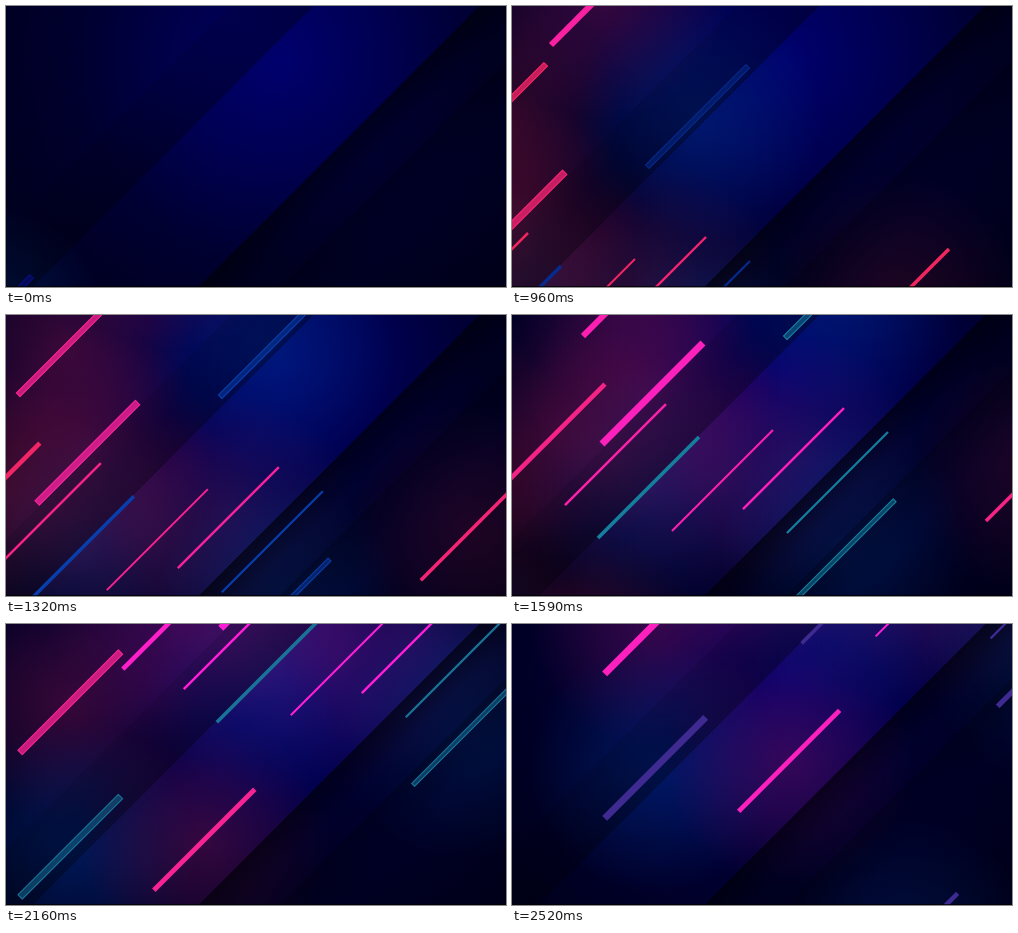
An HTML page with a canvas that plays this animation: 500 by 281 pixels, repeating every 2550 ms.

```html
<!DOCTYPE html>
<html lang="en">
<head>
<meta charset="utf-8">
<title>Neon streaks</title>
<style>
  html, body { margin: 0; width: 100%; height: 100%; overflow: hidden; background: #000018; }
  canvas { display: block; width: 500px; height: 281px; }
</style>
</head>
<body>
<canvas width="500" height="281"></canvas>
<script>
const W = 500, H = 281, LOOP = 2550, STEP = 30;
const SPEED = 0.219, SPAN = 101, GLOW = 125;
const ctx = document.querySelector('canvas').getContext('2d');

// Each streak runs along x + y = c: [c, head x at 960 ms, width, is blue]
const streaks = [
  [92, 34, 6, 0], [78, 140, 6, 0], [219, 53, 7, 0], [296, 236, 6, 1],
  [243, 16, 2.5, 0], [309, 49, 3.6, 1], [376, 123, 2, 0], [425, 194, 2.4, 0],
  [493, 238, 2.2, 1], [680, 437, 3.6, 0], [568, 245, 5, 1], [162, -45, 4.6, 0],
  [142.5, -148, 7, 0], [287, -148, 7, 1], [414, -14, 4.8, 0], [715, 104, 4.5, 1]
];

// Colour of the blue streaks over time: [ms, r, g, b]
const blues = [
  [0, 8, 12, 130], [960, 5, 42, 140], [1320, 8, 62, 172], [1590, 20, 128, 158],
  [1920, 85, 110, 172], [2160, 25, 115, 152], [2520, 62, 42, 145]
];

const mix = (a, b, k) => a.map((v, i) => v + (b[i] - v) * k);
const rgba = (c, a = 1) => `rgba(${c.map(Math.round)},${a})`;
const clamp = v => Math.max(0, Math.min(1, v));

function blueAt(t) {
  const i = Math.max(1, blues.findIndex(b => b[0] >= t));
  const [a, b] = [blues[i - 1], blues[i]];
  return mix(a, b, (t - a[0]) / (b[0] - a[0])).slice(1);
}

function fillAll(gradient, stops) {
  stops.forEach(([p, color]) => gradient.addColorStop(p, color));
  ctx.fillStyle = gradient;
  ctx.fillRect(0, 0, W, H);
}

const backdrop = () => fillAll(ctx.createRadialGradient(275, 55, 0, 275, 55, 340), [
  [0, 'rgb(0,0,110)'], [0.3, 'rgb(0,0,84)'], [0.6, 'rgb(0,0,50)'], [1, 'rgb(0,0,28)']
]);

// Diagonal panels with hard shadow edges
const panels = () => fillAll(ctx.createLinearGradient(0, 0, 390.5, 390.5), [
  [0, 0.05], [225, 0.1], [225, 0.2], [308, 0.35], [308, 0], [474, 0.05],
  [474, 0.72], [520, 0.42], [555, 0.4], [555, 0.55], [620, 0.3], [781, 0.3]
].map(([c, a]) => [c / 781, `rgba(0,0,8,${a})`]));

function place([c, start, w, blue], t) {
  const x = start + SPEED * (t - 960);
  const age = (x - Math.max(0, c - H)) * (c > 600 ? 0.5 : 1);
  const color = blue ? blueAt(t) : mix([240, 38, 85], [255, 30, 215], clamp(age / 240));
  return { x, y: c - x, w, blue, age, color };
}

function glow({ x, y, w, blue, color }) {
  const cx = x - SPAN / 2, cy = y + SPAN / 2;
  const tint = blue ? [0, 50, 140] : color.map(v => v * 0.5);
  const alpha = Math.min(0.48, 0.1 + w * 0.07);
  fillAll(ctx.createRadialGradient(cx, cy, 0, cx, cy, GLOW), [
    [0, rgba(tint, alpha)], [0.5, rgba(tint, alpha * 0.55)], [1, rgba(tint, 0)]
  ]);
}

function bar({ x, y, w, blue, age, color }, t) {
  const length = SPAN * Math.SQRT2;
  const hollow = w >= 5 && (blue ? t < 2400 : age < 140);
  ctx.save();
  ctx.translate(x, y);
  ctx.rotate(-Math.PI / 4);
  ctx.fillStyle = rgba(color, hollow ? (blue ? 0.5 : 0.78) : 1);
  ctx.fillRect(-length, -w / 2, length, w);
  if (hollow) {
    ctx.strokeStyle = rgba(color);
    ctx.strokeRect(0.5 - length, 0.5 - w / 2, length - 1, w - 1);
  }
  ctx.restore();
}

function draw(now) {
  const t = Math.floor(now % LOOP / STEP) * STEP;
  const live = streaks.map(s => place(s, t));
  backdrop();
  live.forEach(glow);
  panels();
  live.forEach(s => bar(s, t));
  ctx.fillStyle = 'rgba(0,0,0,0.75)';
  ctx.fillRect(0, H - 1, W, 1);
}

let begin;
function tick(now) {
  begin ??= now;
  draw(now - begin);
  requestAnimationFrame(tick);
}
draw(0);
requestAnimationFrame(tick);
</script>
</body>
</html>
```
